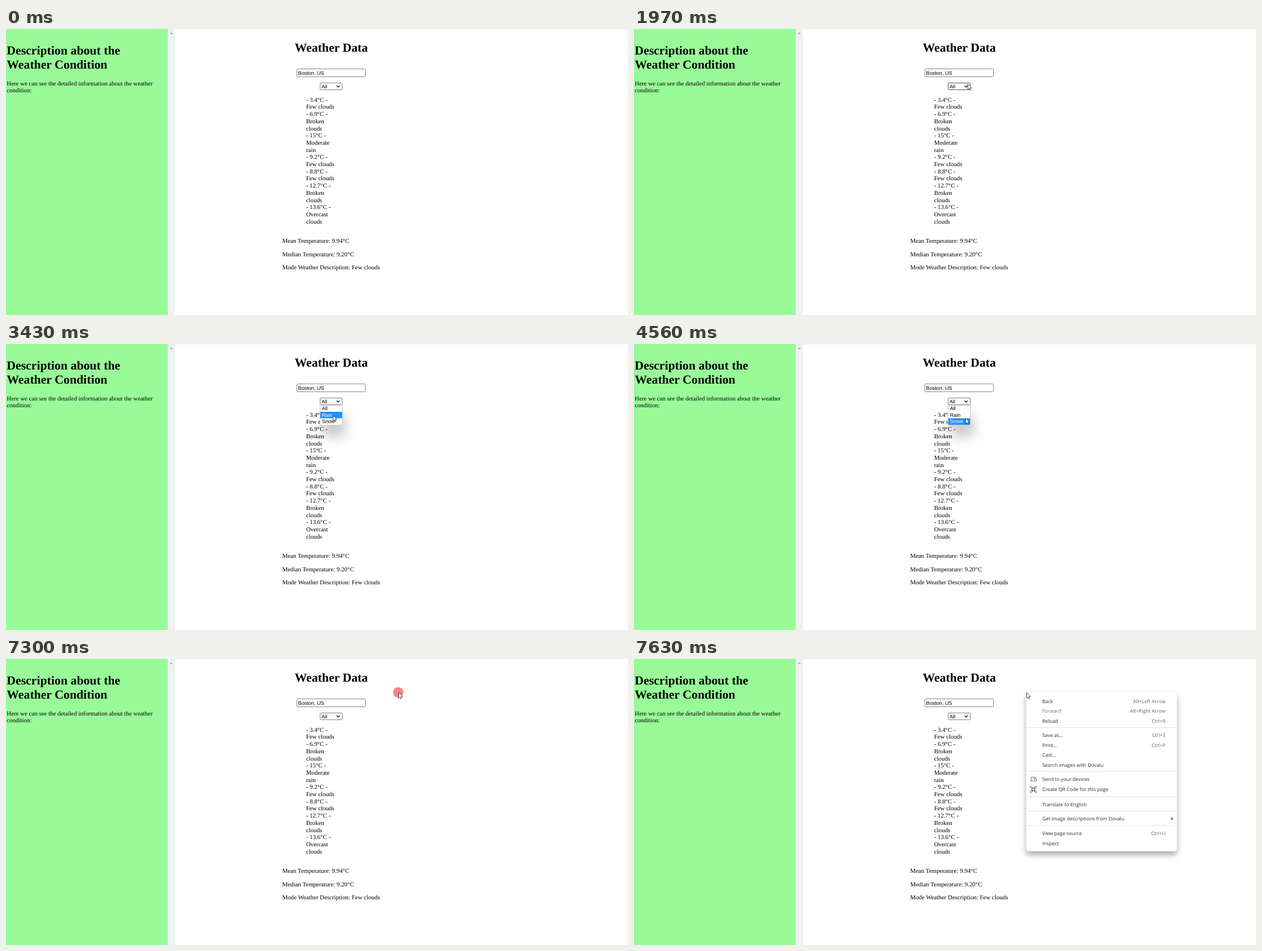
An HTML page for the animation above (8 s loop, 1100 by 509 pixels).

```html
<!DOCTYPE html>
<html lang="en">
<head>
<meta charset="utf-8">
<title>Weather Data</title>
<style>
  html, body { margin: 0; width: 100%; height: 100%; overflow: hidden; background: #fff; }
  svg { display: block; width: 1100px; height: 509px; }
  text { text-rendering: geometricPrecision; white-space: pre; }
  .body { font: 10.89px "Liberation Serif", "Times New Roman", serif; }
  .head { font: bold 21.75px "Liberation Serif", "Times New Roman", serif; }
  .form { font: 9.1px "Liberation Sans", Arial, sans-serif; }
  .menu { font: 8.68px "Open Sans", "Noto Sans", sans-serif; fill: #2b2b2b; }
  .keys { fill: #666; text-anchor: end; }
  .off { fill: #777; }
  .lit { fill: #fff; }
  .icon { fill: none; stroke: #5f6368; stroke-width: 1; }
  #list { filter: drop-shadow(5px 20px 11px rgba(0, 0, 0, .22)); }
  #panel { filter: drop-shadow(0 6px 5.5px rgba(0, 0, 0, .34)); }
</style>
</head>
<body>
<svg viewBox="0 0 1100 509">
  <rect width="1100" height="509" fill="#fff"/>
  <rect y="1" width="1100" height="1" fill="#e2e2e2"/>
  <rect y="1.5" width="286" height="507.5" fill="#98fb98"/>
  <rect x="286" y="2" width="13" height="507" fill="#f1f1f1"/>
  <path d="M289.8 10.8L292.5 7.6L295.2 10.8Z" fill="#a9a9a9"/>

  <g id="page"></g>

  <rect x="514.5" y="72.5" width="121" height="14" rx="1.2" fill="#fff" stroke="#858585"/>
  <text class="form" x="516.6" y="82.8">Boston, US</text>

  <rect id="select" x="555.5" y="97.5" width="39" height="12" rx="1.2" fill="#fff" stroke="#808080"/>
  <text class="form" x="558" y="106.9">All</text>
  <path d="M584.8 102.2L587.4 104.8L590 102.2" fill="none" stroke="#111" stroke-width="1.3"/>

  <g id="list">
    <path d="M555.5 110.3H594.7V142.5Q594.7 145.8 591.4 145.8H558.8Q555.5 145.8 555.5 142.5Z"
      fill="#fff" stroke="#b4b4b4" stroke-width=".8"/>
    <rect id="bar" x="556" width="38.4" height="11.5" fill="#1e90ff"/>
  </g>

  <g id="panel">
    <rect x="693.5" y="60.8" width="266.7" height="282" rx="5.5" fill="#fff"/>
    <g class="icon">
      <path d="M702.3 217V211.6H710.6M700.3 217.9H706"/>
      <rect x="707.8" y="213.4" width="3.6" height="4.9" rx=".5"/>
      <path d="M700.8 230.2V227.5H703.5M709 227.5H711.7V230.2M711.7 235.8V238.5H709M703.5 238.5H700.8V235.8"/>
      <path d="M703 229.7h2.2v2.2h-2.2zM707.3 229.7h2.2v2.2h-2.2zM703 234.1h2.2v2.2h-2.2zM707.3 234.1h2.2v2.2h-2.2z"
        fill="#5f6368"/>
    </g>
    <path d="M949.8 281.9L953.9 285L949.8 288.1Z" fill="#666"/>
  </g>

  <circle id="click" r="9.2" fill="#ff1414" opacity=".52"/>
  <path id="cursor" d="M.4 .5V10.2L2.6 8.2L4.1 11.6L5.6 11L4.1 7.6L7.2 7.4Z"
    fill="#fff" stroke="#222" stroke-width=".8" stroke-linejoin="round"/>
</svg>
<script>
const LOOP = 8000;
const $ = id => document.getElementById(id);

function add(parent, tag, attrs, label = "") {
  const el = document.createElementNS("http://www.w3.org/2000/svg", tag);
  for (const key in attrs) el.setAttribute(key, attrs[key]);
  el.textContent = label;
  return parent.appendChild(el);
}

function lines(style, x, y, gap, list) {
  list.forEach((label, i) =>
    add($("page"), "text", { class: style, x, y: y + gap * i }, label));
}

lines("head", 1.3, 46.8, 25.3, ["Description about the", "Weather Condition"]);
lines("body", 1.3, 101.7, 12.7, [
  "Here we can see the detailed information about the weather", "condition:"]);
lines("head", 510.5, 41.8, 0, ["Weather Data"]);
lines("body", 530.7, 130.7, 12.7, [
  "- 3.4°C -", "Few clouds", "- 6.9°C -", "Broken", "clouds",
  "- 15°C -", "Moderate", "rain", "- 9.2°C -", "Few clouds",
  "- 8.8°C -", "Few clouds", "- 12.7°C -", "Broken", "clouds",
  "- 13.6°C -", "Overcast", "clouds"]);
lines("body", 488.5, 381, 23.65, [
  "Mean Temperature: 9.94°C", "Median Temperature: 9.20°C",
  "Mode Weather Description: Few clouds"]);

const options = ["All", "Rain", "Snow"].map((label, i) =>
  add($("list"), "text", { x: 558.7, y: 119.2 + 11.5 * i }, label));

// [centre y, label, shortcut]
[
  [76.5, "Back", "Alt+Left Arrow"], [94, "Forward", "Alt+Right Arrow"],
  [111.8, "Reload", "Ctrl+R"], [137, "Save as...", "Ctrl+S"],
  [154.6, "Print...", "Ctrl+P"], [172, "Cast..."],
  [189.5, "Search images with Dovalu"], [215, "Send to your devices"],
  [233.2, "Create QR Code for this page"], [259.6, "Translate to English"],
  [285, "Get image descriptions from Dovalu"],
  [311, "View page source", "Ctrl+U"], [328.7, "Inspect"]
].forEach(([cy, label, keys]) => {
  const y = cy + 3.1;
  const tone = label === "Forward" ? "menu off" : "menu";
  add($("panel"), "text", { class: tone, x: 722, y }, label);
  if (keys) add($("panel"), "text", { class: "menu keys", x: 940, y }, keys);
});
[123, 200.5, 245.5, 271, 296.5].forEach(y =>
  add($("panel"), "rect", { x: 693.5, y, width: 266.7, height: 1, fill: "#e1e1e1" }));

// Pointer moves: [start, end, steps, x, y]
const START = [1009, 478];
const moves = [
  [570, 700, 3, 984, 298], [1030, 1160, 3, 779, 205],
  [1430, 1630, 4, 588, 98], [1900, 1970, 2, 590, 99],
  [2960, 3230, 5, 577, 128], [3430, 3430, 1, 578, 128],
  [3830, 3960, 3, 588, 136], [4560, 4560, 1, 586, 133],
  [4630, 4830, 4, 706, 59], [5090, 5230, 3, 694, 61]
];
const path = [];
let [px, py] = START;
for (const [from, to, steps, x, y] of moves) {
  for (let i = 0; i < steps; i++) {
    const time = steps > 1 ? from + (to - from) * i / (steps - 1) : from;
    const p = 1 - (1 - (i + 1) / steps) ** 2;
    path.push([time, px + (x - px) * p, py + (y - py) * p]);
  }
  [px, py] = [x, y];
}

const rows = [[0, 0], [3095, 1], [3830, 2], [4630, 1]];
const fades = [[0, 0], [7430, .35], [7500, .75], [7570, 1]];

const held = (table, t) => table.findLast(step => step[0] <= t + .01);
const within = (t, a, b) => t >= a && t < b;
const show = (id, on) => { $(id).style.display = on ? "" : "none"; };

function draw(t) {
  const spot = held(path, t);
  show("cursor", spot);
  if (spot) $("cursor").setAttribute("transform", `translate(${spot[1]} ${spot[2]})`);

  const late = t >= 7300;
  show("click", within(t, 2430, 2700) || within(t, 7300, 7630));
  $("click").setAttribute("cx", late ? 693.6 : 590);
  $("click").setAttribute("cy", late ? 61 : 99);

  $("select").setAttribute("stroke", within(t, 1630, 2960) ? "#4f4f4f" : "#808080");
  show("list", within(t, 2500, 7300));
  const row = held(rows, t)[1];
  $("bar").setAttribute("y", 110.5 + 11.5 * row);
  options.forEach((el, i) => el.setAttribute("class", i === row ? "form lit" : "form"));

  const fade = held(fades, t)[1];
  show("panel", fade);
  $("panel").style.opacity = fade;
}

const begin = performance.now();
function tick() {
  draw((performance.now() - begin) % LOOP);
  requestAnimationFrame(tick);
}
tick();
</script>
</body>
</html>
```
